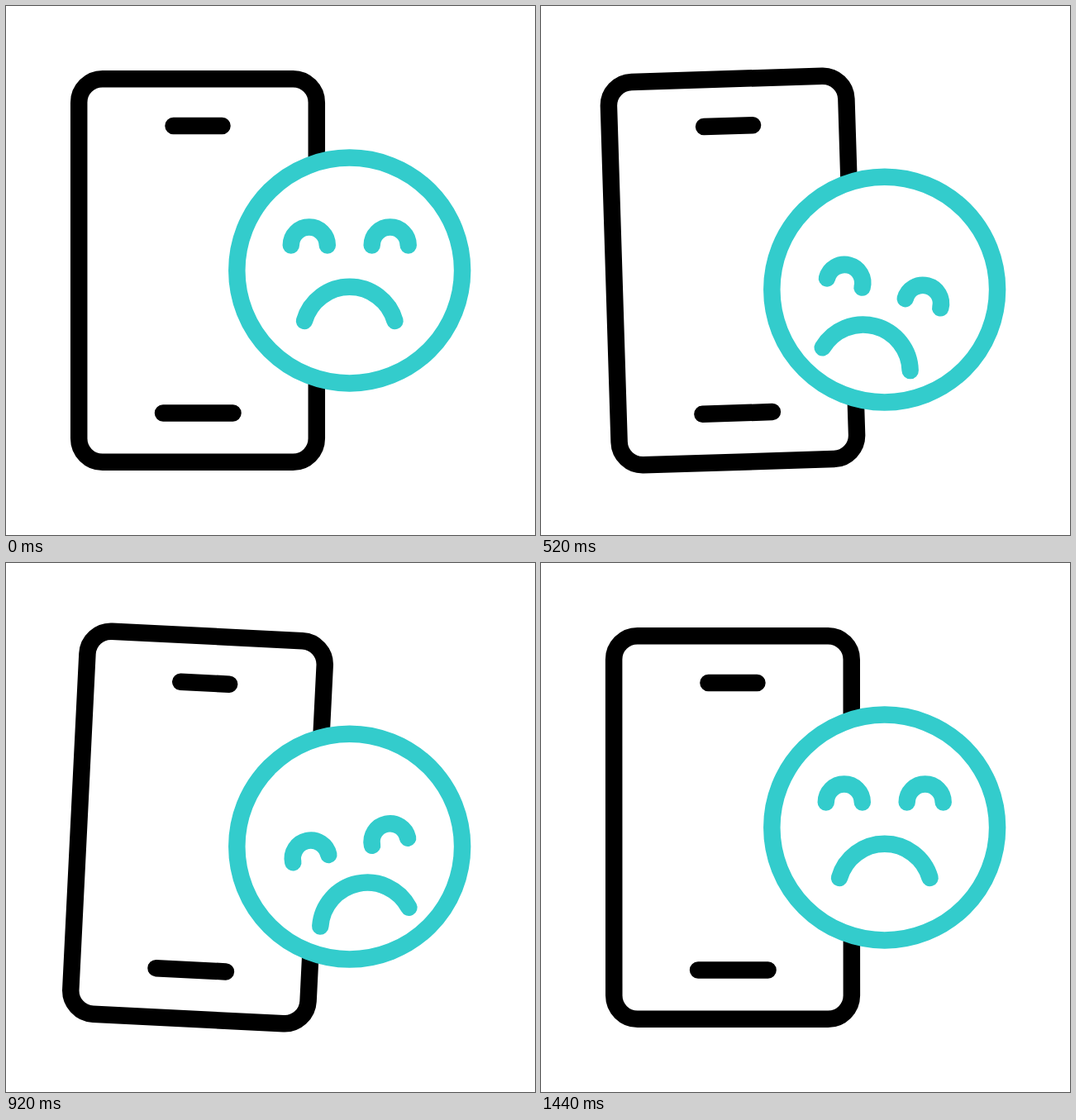
An HTML page that plays this animation: 640x640 px, repeating every 1480 ms.

```html
<!DOCTYPE html>
<html lang="en">
<head>
<meta charset="utf-8">
<title>Sad phone</title>
<style>
  html, body { margin: 0; width: 100%; height: 100%; overflow: hidden; background: #fff; }
  svg { display: block; width: 100%; height: 100%; }
</style>
</head>
<body>
<svg viewBox="0 0 640 640" fill="none" stroke-width="20.5" stroke-linecap="round">
  <g id="phone" stroke="#000">
    <rect x="88.2" y="88.2" width="287.6" height="463.6" rx="28.5"/>
    <path d="M202.5 145H261.5M190 492.5H274.5"/>
  </g>
  <g id="face" stroke="#33cccc">
    <circle cx="415.7" cy="320" r="136.4" fill="#fff"/>
    <g id="look">
      <path id="eyes" d="M344.8 289.5a22 22 0 0 1 44 0M442.7 289.5a22 22 0 0 1 44 0"/>
      <path id="mouth" d="M361 381a57 57 0 0 1 109.5 0"/>
    </g>
  </g>
</svg>
<script>
const LOOP = 1480, STEP = 40;

// Keys are [time in ms, value], eased in and out between neighbours.
const phoneTilt = [[0, 0], [370, 2], [625, -4], [895, 3], [1125, -1.9], [1460, 0]];
const faceTilt = [[0, 0], [495, 15], [885, -12], [920, -12], [1455, 0]];
const droop = [[125, 0], [646, 1], [794, 1], [1315, 0]];

const [phone, face, look, eyes, mouth] =
  ['phone', 'face', 'look', 'eyes', 'mouth'].map(id => document.getElementById(id));

function valueAt(keys, t) {
  if (t <= keys[0][0]) return keys[0][1];
  for (let i = 1; i < keys.length; i++) {
    const [t0, a] = keys[i - 1], [t1, b] = keys[i];
    if (t < t1) {
      const x = (t - t0) / (t1 - t0);
      return a + (b - a) * x * x * (3 - 2 * x);
    }
  }
  return keys[keys.length - 1][1];
}

const set = (el, transform) => el.setAttribute('transform', transform);
const moveDown = (el, y) => set(el, `translate(0 ${y})`);

function draw(t) {
  const d = valueAt(droop, t);
  set(phone, `rotate(${valueAt(phoneTilt, t)} 232 320)`);
  set(look, `rotate(${valueAt(faceTilt, t)} 415.7 320)`);
  moveDown(face, 27 * d);
  moveDown(eyes, 41 * d);
  moveDown(mouth, 30.5 * d);
}

const start = performance.now();
function tick() {
  const t = (performance.now() - start) % LOOP;
  draw(Math.floor(t / STEP) * STEP);
  requestAnimationFrame(tick);
}
tick();
</script>
</body>
</html>
```
